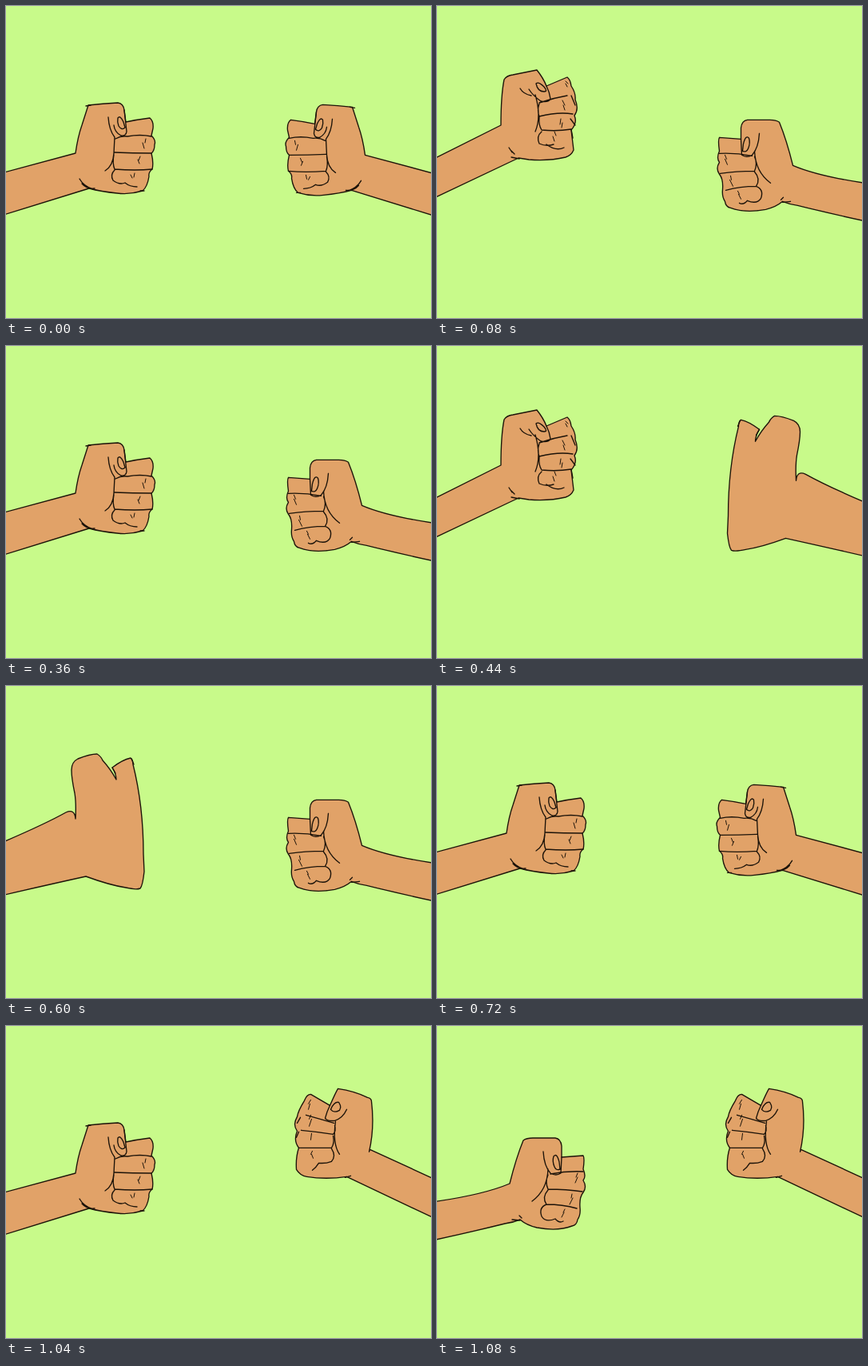
These frames come from a looping animation (532 by 390 pixels, 1360 ms). An HTML page:

```html
<!DOCTYPE html>
<html lang="en">
<head>
<meta charset="utf-8">
<title>Two fists</title>
<style>
  html, body { margin: 0; width: 100%; height: 100%; overflow: hidden; background: #c8fa8a; }
  svg { display: block; width: 100vw; height: 100vh; }
  path { stroke: #1c1309; stroke-width: 1.35; stroke-linecap: round; stroke-linejoin: round; fill: none; }
  .skin { fill: #e1a268; }
  .tick { stroke-width: 1; }
</style>
</head>
<body>
<svg id="stage" viewBox="0 0 532 390" preserveAspectRatio="none"></svg>
<script>
// Every pose is drawn for the left hand; the right hand is its mirror image.
const poses = {
  middle: {
    skin: `M-6 209L87 184Q90 163 95 149L103 124Q121 122 140 121Q147 122 148 130L150 145
      Q164 142 180 140Q185 144 184 153L182 162Q188 168 186 173Q186 181 182 184
      Q185 196 183 204Q178 208 179 213Q177 226 171 231Q155 236 139 234Q119 232 104 228L-6 262`,
    lines: `M100 125L106 124M148 130L151 157Q150 163 144 162Q136 158 135 149
      M140 140Q143 136 147 145L149 152Q145 156 141 150Q139 145 140 140
      M128 139Q129 155 136 164L135 184Q134 200 124 206
      M137 166Q144 162 152 163Q168 160 182 163M136 183Q158 184 182 184
      M135 186Q133 197 136 204Q162 206 183 204
      M136 205Q130 211 134 218Q142 224 149 221Q155 226 164 226
      M92 216Q97 225 109 229M95 222Q101 229 111 228M168 231L173 231`,
    ticks: 'M175 166L174 171M171 171L173 178M168 188L166 193M165 192L167 197M161 209L160 214M156 211L158 215'
  },
  low: {
    skin: `M-6 220Q58 211 91 197Q99 165 108 143Q112 140 120 140L148 140Q155 141 156 150L156 164
      L183 162Q185 165 183 179Q187 188 183 193Q188 201 183 208Q178 214 179 227
      Q180 236 176 242Q175 249 169 250Q151 257 125 252Q112 249 104 242Q94 246 85 247Q45 257 -6 268`,
    lines: `M156 164L155 184Q149 188 142 184Q134 175 133 157
      M146 163Q150 158 153 170L154 179Q149 181 147 176Q144 169 146 163
      M139 179Q138 205 119 219M142 185Q163 181 183 182
      M139 186Q135 195 139 204Q162 204 182 207M139 205Q131 214 137 223Q157 223 175 228
      M137 223Q127 227 131 238Q136 246 148 241Q153 247 158 244
      M94 242L104 243M103 237L106 240`,
    ticks: 'M176 184L174 189M176 189L173 196M169 210L168 215M170 215L166 223M160 229L158 233M159 233L156 239'
  },
  raised: {
    skin: `M-6 192L80 149Q80 112 84 92Q87 87 95 86Q110 83 125 80Q133 90 137 100
      L163 89Q167 92 168 100Q174 109 173 117Q178 129 172 137Q176 146 168 155
      L171 180Q168 187 161 189Q140 194 115 192L102 190L-6 241`,
    lines: `M124 97Q127 94 134 101Q139 107 134 107Q126 107 124 97
      M104 103Q108 110 118 112M115 104Q120 112 130 119Q140 121 142 116Q141 108 137 100
      M123 111Q131 138 123 157M128 121Q145 115 163 112M168 112L173 124
      M128 122Q125 131 128 138Q152 132 170 135M167 141L173 149
      M128 139Q127 149 131 155Q150 157 168 154L170 165
      M131 157Q124 163 128 172Q137 176 146 173M137 173Q149 182 159 177
      M90 177L94 183M93 181L97 185M93 189L103 191`,
    ticks: 'M161 94L164 97M161 97L163 101M157 118L160 124M158 124L160 130M155 141L154 148M157 146L156 152M147 157L149 162M145 163L147 169'
  },
  high: {
    skin: `M-6 192L81 152L82 155Q75 125 79 92Q79 88 84 87Q100 79 121 76Q124 81 131 97
      L155 83Q160 83 163 91Q171 104 172 111Q178 121 172 129Q177 141 170 150
      Q174 162 173 177Q168 185 160 186Q136 190 110 186L-6 241`,
    lines: `M118 97L120 93Q126 92 130 102Q126 107 119 103Q117 100 118 97
      M110 102Q115 113 125 116Q134 117 137 113Q135 105 131 97
      M124 117Q128 145 119 158M126 119Q143 114 161 109M168 112L172 119
      M125 122Q123 129 127 133Q146 130 167 128M170 130L173 137
      M127 135Q125 144 129 150Q149 150 170 150
      M129 151Q123 160 129 167Q137 170 145 169Q148 174 153 178M105 185L112 187`,
    ticks: 'M155 90L158 95M156 95L158 102M155 109L157 114M154 114L157 123M154 132L155 140M153 154L155 158M154 158L152 163'
  },
  palm: {
    skin: `M-6 196Q48 173 75 158Q86 153 87 166Q88 146 86 134Q82 115 82 105Q82 95 90 91
      Q105 85 114 85Q119 88 121 93Q131 104 138 117Q138 110 133 102Q146 92 156 90
      Q159 92 159 98Q172 150 172 210L173 232Q171 250 168 253Q163 255 150 252
      Q130 249 100 238Q50 249 -6 262`,
    lines: 'M157 91L160 98M133 102L137 109',
    ticks: ''
  }
};

// start in ms, left pose, right pose
const steps = [
  [0, 'middle', 'middle'],
  [80, 'raised', 'low'],
  [160, 'middle', 'middle'],
  [240, 'palm', 'raised'],
  [280, 'low', 'middle'],
  [360, 'middle', 'low'],
  [440, 'raised', 'palm'],
  [520, 'middle', 'middle'],
  [600, 'palm', 'low'],
  [640, 'low', 'low'],
  [720, 'middle', 'middle'],
  [800, 'raised', 'high'],
  [880, 'high', 'raised'],
  [1040, 'middle', 'high'],
  [1080, 'low', 'high']
];
const loop = 1360;

const stage = document.getElementById('stage');

function svg(tag, attrs, parent) {
  const el = document.createElementNS('http://www.w3.org/2000/svg', tag);
  for (const key in attrs) el.setAttribute(key, attrs[key]);
  return parent.appendChild(el);
}

function makeHand(transform) {
  const hand = svg('g', { transform }, stage);
  const groups = {};
  for (const [name, pose] of Object.entries(poses)) {
    const group = groups[name] = svg('g', {}, hand);
    svg('path', { class: 'skin', d: pose.skin }, group);
    svg('path', { d: pose.lines }, group);
    svg('path', { class: 'tick', d: pose.ticks }, group);
  }
  return name => {
    for (const key in groups) groups[key].style.display = key === name ? '' : 'none';
  };
}

const showLeft = makeHand('translate(0 0)');
const showRight = makeHand('translate(536.5 2.3) scale(-1 1)');
const start = performance.now();
let current;

function draw() {
  const t = Math.max(0, performance.now() - start) % loop;
  const step = steps.findLast(([from]) => from <= t);
  if (step !== current) {
    current = step;
    showLeft(step[1]);
    showRight(step[2]);
  }
  requestAnimationFrame(draw);
}
draw();
</script>
</body>
</html>
```
